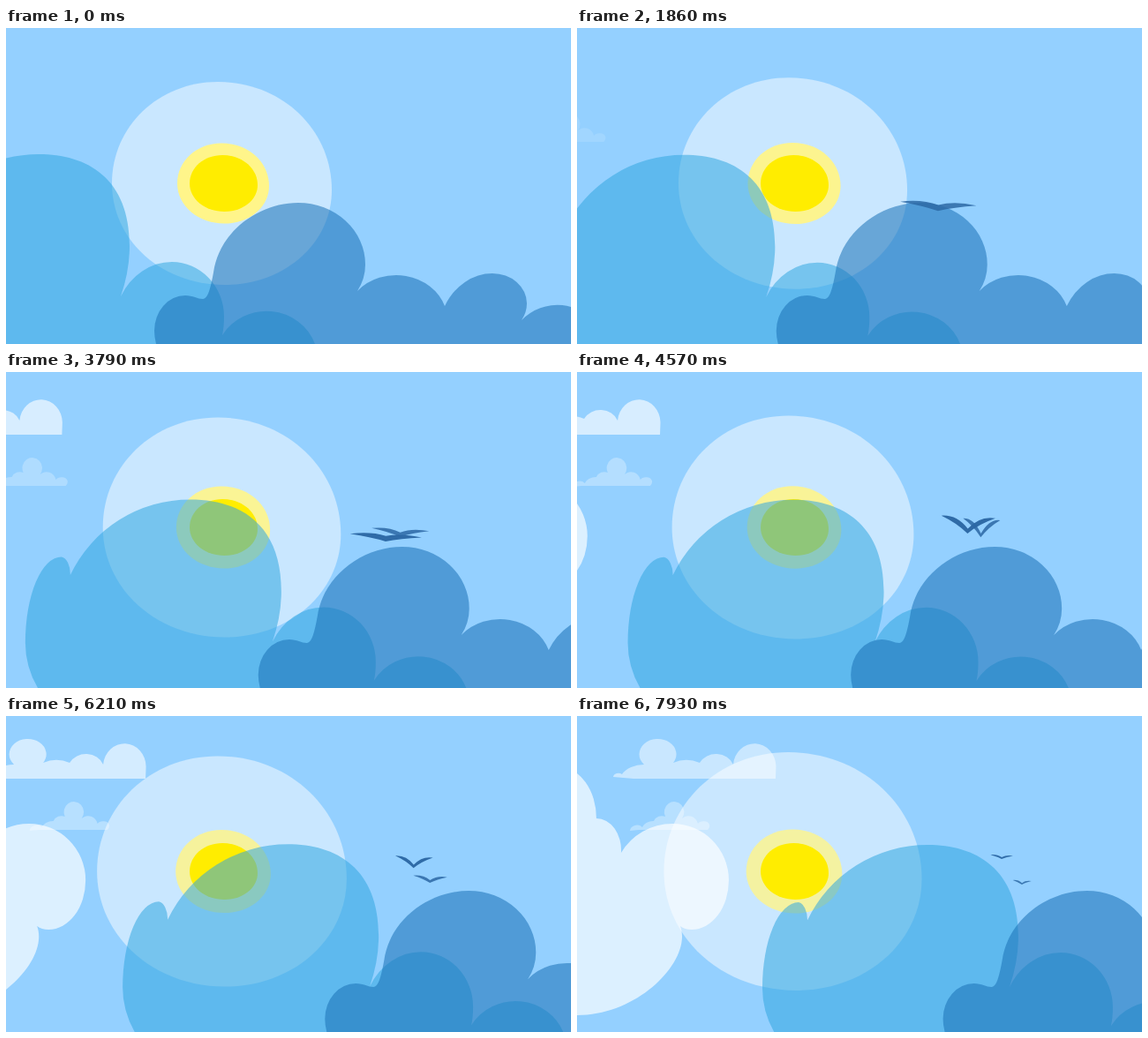
Recreate the animation shown at these times as an HTML page. Size 640 by 358 pixels, loop 8000 ms.

```html
<!DOCTYPE html>
<html lang="en">
<head>
<meta charset="utf-8">
<title>Clouds and sun</title>
<style>
  html, body { margin: 0; width: 100%; height: 100%; overflow: hidden; background: #94d0ff; }
  svg { display: block; width: 100%; height: 100%; }
</style>
</head>
<body>
<svg viewBox="0 0 640 358" preserveAspectRatio="xMidYMid slice">
  <rect width="640" height="358" fill="#94d0ff"/>
  <path id="halo" fill="#c9e7ff"/>
  <path id="ring" fill="#fff58a"/>
  <path id="core" fill="#ffed00"/>
  <path id="puff" fill="#fff" d="M60 130A8 7 0 0 1 74 126A13 9 0 0 1 87 119A10 10 0 0 1 100 114A11.3 11.7 0 1 1 119 116A11 11 0 0 1 137 122A7 5 0 0 1 150 123Q151 126 148 129H70Z"/>
  <path id="strip" fill="#fff" d="M41 69A6 5 0 0 1 51 66A28 20 0 0 1 76 55A21 17.3 0 1 1 109 53A38 38 0 0 1 139 53A21 19 0 0 1 177 55A24.3 26 0 0 1 225.5 57L225 71H64Z"/>
  <path id="white" fill="#fff" opacity=".68" d="M-20 58A42 58 0 0 1 22 116A28 36 0 0 1 50 155A68 69 0 0 1 108 122A64 64 0 0 1 172 186A42 56 0 0 1 130 242Q122 242 117 238C131 275 72 339 0 339H-20Z"/>
  <path id="light" fill="#30a6e0" opacity=".54" d="M-135 358Q-150 333 -150 305A41 97 0 0 1 -109 208A11 20 0 0 1 -99 228.5A150 148 0 0 1 37 143C92 143 140 170 140 247Q140 275 130 304A66 75 0 0 1 188 265A59 62 0 0 1 247 327Q247 339 245 348A58 55 0 0 1 350 358V370H-130Z"/>
  <path id="dark" fill="#1b71b7" opacity=".55" d="M170 358Q168 350 168 343A35 40 0 0 1 203 303C212 303 217 307 223 307S232 293 235 277C241 232 285 198 331 198A76 70 0 0 1 407 268Q407 284 398 298A58 51.6 0 0 1 497 315A62 73 0 0 1 551 278A39 34 0 0 1 590 312Q590 322 584 331A55 53 0 0 1 672 340V370H173Z"/>
  <path id="birdB" fill="#2c68a5"/>
  <path id="birdA" fill="#2c68a5"/>
</svg>
<script>
const LOOP = 8000, STEPS = 112, END = 7.93;
const set = (id, attrs) => {
  for (const k in attrs) document.getElementById(id).setAttribute(k, attrs[k]);
};
const clamp = v => Math.max(0, Math.min(1, v));
const shift = (x, y = 0) => `translate(${x} ${y})`;

// A slightly skewed ellipse
function egg(cx, cy, rx, ry) {
  const top = [cx - .035 * rx, cy - ry], right = [cx + rx, cy + .065 * ry];
  const bottom = [cx + .025 * rx, cy + ry], left = [cx - rx, cy];
  const mix = (a, b) => a + (b - a) * .56;
  const bend = (a, b, flat) => flat
    ? `C${mix(a[0], b[0])} ${a[1]} ${b[0]} ${mix(b[1], a[1])} ${b}`
    : `C${a[0]} ${mix(a[1], b[1])} ${mix(b[0], a[0])} ${b[1]} ${b}`;
  return `M${top}` + bend(top, right, true) + bend(right, bottom, false) +
    bend(bottom, left, true) + bend(left, top, false) + 'Z';
}

// A gull of wing length len; its wings rise and fall once per beat
function gull(len, beat) {
  const angle = (30 - 21 * Math.cos(2 * Math.PI * beat)) * Math.PI / 180;
  const c = len * Math.cos(angle), h = len * Math.sin(angle);
  const top = -.9 * h - .11 * len, low = -.6 * h;
  return `M${-c} ${-h}Q${-.42 * c} ${top} 0 ${-.15 * len}Q${.42 * c} ${top} ${c} ${-h}` +
    `Q${.4 * c} ${low} 0 0Q${-.4 * c} ${low} ${-c} ${-h}Z`;
}

// Each bird swoops up around its start, then drifts away to (x, y) and shrinks
const birds = {
  birdA: { start: 3.07, x: 481, y: 162, vx: 11.3, vy: -6, dx: 22, dy: 26, len: 46, shrink: 6.7, beat: .35, rate: .925, alpha: .97 },
  birdB: { start: 1.86, x: 504, y: 191, vx: 13.9, vy: 1.1, dx: 10.6, dy: 22.7, len: 44, shrink: 5.37, beat: .07, rate: .944, alpha: .85 }
};

function drawBird(id, t) {
  const b = birds[id], age = t - b.start, left = END - t;
  const swoop = Math.exp(-2.3 * age);
  const x = b.x - b.vx * left - b.dx * swoop;
  const y = b.y - b.vy * left + b.dy * swoop;
  set(id, {
    d: gull(b.len - b.shrink * age, b.beat + b.rate * age),
    transform: shift(x, y) + ' rotate(3)',
    opacity: b.alpha * clamp(1 + age / .7)
  });
}

function draw(t) {
  const p = t / END, left = t - END;
  const glow = 1 + .173 * p, rim = 1 + .045 * p;
  set('halo', { d: egg(244.5, 176, 124.5 * glow, 115 * glow) });
  set('ring', { d: egg(246, 176, 52 * rim, 45.5 * rim), opacity: 1 - .2 * p });
  set('core', { d: egg(246.5, 176, 38.5, 32) });
  set('puff', { transform: shift(19.4 * left), opacity: Math.min(.33, .065 * t) });
  set('strip', { transform: shift(39 * left), opacity: .63 - .14 * p ** 6 });
  set('white', { transform: shift(47.7 * left) });
  set('light', { transform: shift(45.4 * t, .38 * t) });
  set('dark', { transform: shift(31.1 * t) });
  for (const id in birds) drawBird(id, t);
}

function tick() {
  const step = Math.floor((performance.now() % LOOP + 6) * STEPS / LOOP) % STEPS;
  draw(step * LOOP / STEPS / 1000);
  requestAnimationFrame(tick);
}
tick();
</script>
</body>
</html>
```
